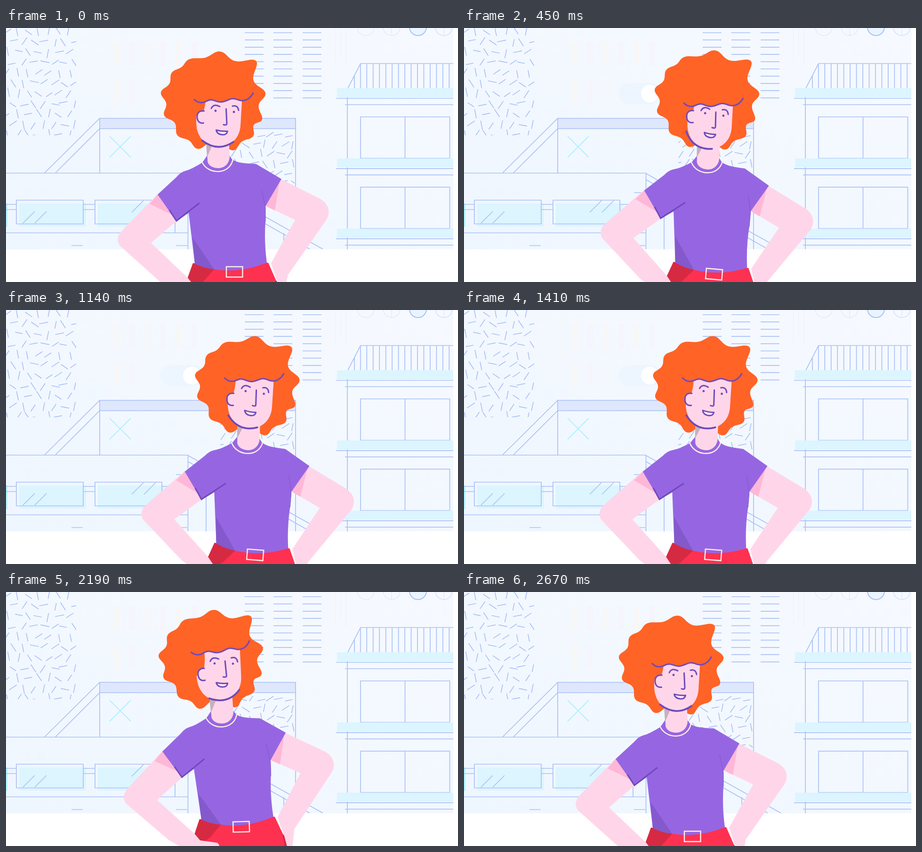
Write an HTML page that moves like this. It is 960x540 px and loops after 2700 ms.

```html
<!DOCTYPE html>
<html lang="en">
<head>
<meta charset="utf-8">
<title>Hands on hips</title>
<style>
  html, body { margin: 0; width: 100%; height: 100%; overflow: hidden; background: #fff; }
  svg { display: block; width: 960px; height: 540px; }
  .line { fill: none; stroke: #a9c1f6; stroke-width: 1.7; }
  .cyan { fill: #dcf5ff; }
  .hair { fill: #ff6326; }
  .skin { fill: #ffd6e9; }
  .blush { fill: #ffb7d7; }
  .ink { fill: none; stroke: #7049bd; stroke-width: 3; stroke-linecap: round; stroke-linejoin: round; }
  .trim { fill: none; stroke: #fff1e6; stroke-width: 2.4; }
</style>
</head>
<body>
<svg viewBox="0 0 960 540">
  <defs>
    <linearGradient id="sky" x1="0" y1="1" x2="1" y2="0">
      <stop offset="0" stop-color="#eef6ff"/><stop offset=".5" stop-color="#f3f8ff"/><stop offset="1" stop-color="#f6f9ff"/>
    </linearGradient>
    <clipPath id="town"><rect width="950" height="470.5"/></clipPath>
    <clipPath id="wall"><rect width="149" height="228"/></clipPath>
    <clipPath id="panel"><rect x="455" y="221" width="158" height="112"/></clipPath>
  </defs>

  <g clip-path="url(#town)">
    <rect width="950" height="471" fill="url(#sky)"/>
    <path id="wallDashes" class="line" clip-path="url(#wall)"/>

    <g id="bars"></g>
    <rect x="328" y="117" width="90" height="45" rx="22.5" fill="#edf5ff"/>
    <circle cx="395" cy="139.5" r="19" fill="#fff"/>
    <path id="slats" class="line"/>
    <path d="M700 0V72M711 0V60M722 0V75" stroke="#e9f0fc" fill="none"/>
    <g fill="none" stroke="#e1eafb" stroke-width="1.5">
      <circle cx="764" cy="-2" r="18"/>
      <circle cx="819" cy="-2" r="18"/><path d="M819 0V16"/>
      <circle cx="930" cy="-2" r="18" stroke="#d3e0fa"/><path d="M930 0V16M914 0H946"/>
    </g>
    <circle cx="875" cy="-2" r="18" fill="#eaf4ff" stroke="#a9c1f6" stroke-width="2"/>

    <rect x="199" y="192" width="416" height="22" fill="#dfe7fd"/>
    <path class="line" d="M199 308V192H615V471M199 214H615M199 192L82 308M199 214L105 308"/>
    <path d="M220 230L265 275M265 230L220 275" stroke="#b3f0fb" stroke-width="2"/>
    <path id="panelDashes" class="line" clip-path="url(#panel)"/>

    <rect y="373" width="3" height="50" fill="#b2f2ff"/>
    <path class="cyan" d="M28 373H170V422H28ZM195 373H337V422H195Z"/>
    <path class="line" d="M0 308.5H386.5V471M0 435.5H386M22 366H164V416.5H22ZM189 366H331V416.5H189Z
      M0 375H22M0 386H22M164 375H189M164 386H189M331 375H359M359 375V435
      M36 415L61 390M61 415L86 390M267 392L292 367M293 392L318 367
      M139 462.5H163M361 462.5H385M361 350H380M425 331V471M590 436V471
      M386 309L673 470M386 322L645 470"/>

    <path id="rails" class="line"/>
    <path class="line" d="M725 471V130L753 75.5H950"/>
    <g id="floors"></g>
  </g>

  <g class="head"><path id="mane" class="hair"/></g>

  <g id="body">
    <path fill="#ff3151" d="M397 500L386 532L380 575H590L575 540L557 499Z"/>
    <path fill="#d62a42" d="M397 500L442 513L418 540L400 552L385 533ZM572 536L581 542V565H577Z"/>
    <path class="skin" d="M322 353L246 431Q231 447 242 463L330 542L390 580L435 566Q441 556 433 551L397 545L386 531L308 457L364 409Z"/>
    <path class="skin" d="M583 321L667 363Q688 376 685 396Q684 403 679 410L598 526L592 570L582 565L576 540L563 500L614 408L551 378Z"/>
    <path class="blush" d="M324 352L305 374L354 398L346 386ZM582 322L551 378L571 388Z"/>
    <path fill="#9666e2" d="M417 286C402 295 392 301 380 304Q370 307 362 317L322 354L362 411L388 393L401 501Q474 531 554 499Q548 455 551 412V379L585 321L531 289C512 288 492 288 480 279L474 270H428Z"/>
    <path fill="#8459cc" d="M396 445L442 513Q418 510 401 501Z"/>
    <path d="M543 345L551 382V412" fill="none" stroke="#7f54cd"/>
    <path class="ink" style="stroke-linecap:butt;stroke-linejoin:miter" d="M347 387L362 410L411 372"/>
    <path class="skin" d="M425 235H473L475 272C475 289 463 298 451 298C437 298 427 290 428 280Z"/>
    <path fill="#c8b0bb" d="M425 245H440L427 275Z"/>
    <path class="trim" d="M417 286C430 313 476 312 482 279"/>
    <rect class="trim" x="468" y="507.5" width="34.5" height="22"/>
  </g>

  <g class="head">
    <g id="face">
      <path class="skin" d="M404 140V200C404 232 424 252.5 451 252.5S496 234 498 208L502 140Z"/>
      <path id="chin" class="ink" style="stroke-width:3.8" d="M416.5 239Q450 265 483 242"/>
    </g>
    <g id="ear">
      <path class="hair" d="M424 140C425 162 421 170 420 177C409 175 404 182 404 191H394V140Z"/>
      <path class="ink" d="M420.5 176.5C409 175 405 183 406 191C407 200 413 203 419.5 202"/>
    </g>
    <g id="features">
      <path class="ink" d="M436 171Q441 160 454 167M481 166Q492 163 494 175M467.5 172L469 203Q469 207.5 462 205.5"/>
      <path class="ink" style="fill:#ffeaf4" d="M446.5 217Q458 220 470.5 219.5Q469 227 460 227Q448 226 446.5 217Z"/>
      <g fill="#7049bd"><circle cx="445" cy="176" r="2.4"/><circle cx="484" cy="178.5" r="2.4"/></g>
    </g>
    <g id="fringe">
      <path class="hair" d="M400 152C408 160 418 160 425 156C440 147 446 160 460 157C475 154 476 146 494 153C505 157 518 152 525 138L505 110H420Z"/>
      <path class="ink" d="M400 152C408 160 418 160 425 156C440 147 446 160 460 157C475 154 476 146 494 153C505 157 518 152 525 138"/>
    </g>
  </g>
</svg>

<script>
const LOOP = 2700, STEP = 30;
const $ = id => document.getElementById(id);
const range = (n, fn) => Array.from({ length: n }, (_, i) => fn(i)).join('');

// Scenery
let seed = 11;
const rand = () => (seed = seed * 16807 % 2147483647) / 2147483647;

function dashes(x, y, w, h, cell) {
  let d = '';
  for (let j = 0; j <= h / cell; j++) {
    for (let i = -1; i <= w / cell; i++) {
      const a = Math.floor(rand() * 8) * Math.PI / 8 + .2, r = 8 + rand() * 2;
      const cx = x + (i + (j % 2) / 2 + rand() * .3) * cell, cy = y + (j + rand() * .3) * cell;
      const dx = r * Math.cos(a), dy = r * Math.sin(a);
      d += `M${cx - dx} ${cy - dy}L${cx + dx} ${cy + dy}`;
    }
  }
  return d;
}
$('wallDashes').setAttribute('d', dashes(0, 4, 149, 228, 22));
$('panelDashes').setAttribute('d', dashes(458, 225, 156, 108, 20));
$('slats').setAttribute('d', range(10, i =>
  [507, 568, 630].map(x => `M${x} ${10 + i * 15.4}h40`).join('')));
$('rails').setAttribute('d', 'M740 102V128' + range(15, i => `M${752.8 + i * 13.46} 75.5V128`));
$('bars').innerHTML = range(8, i =>
  `<rect x="${229 + i % 6 * 33}" y="${i < 6 ? 30 : 112}" width="11" height="50" fill="${i % 2 ? '#f6f4fc' : '#f8f7f8'}"/>`);
$('floors').innerHTML = range(3, i => {
  const y = 128 + i * 149.3;
  const pane = i < 2 ? `M753 ${y + 61}h189.5v88h-189.5ZM847.5 ${y + 61}v88` : '';
  return `<rect class="cyan" x="703" y="${y}" width="247" height="19"/>
    <path class="line" d="M701 ${y + 21.5}H950M720 ${y + 35}H950${pane}"/>`;
});

// Curls: tip x, tip y, depth of the hollow before the next tip
const curls = [
  [455, 50, 12], [531, 70, 17], [551, 138, 11], [544, 194, 10], [525, 230, 4], [481, 260, 20],
  [409, 257, 4], [364, 228, 10], [336, 186, 8], [329, 137, 7], [352, 95, 3], [390, 66, 5]
];
function curlPoints() {
  return curls.flatMap(([x, y, depth], i) => {
    const [nx, ny] = curls[(i + 1) % curls.length];
    const mx = (x + nx) / 2, my = (y + ny) / 2;
    const dx = 440 - mx, dy = 150 - my, k = depth / Math.hypot(dx, dy);
    return [[x, y], [mx + dx * k, my + dy * k]];
  });
}

// Closed smooth curve through points
function smooth(p) {
  const at = i => p[(i + p.length) % p.length];
  const ctrl = (a, b, c) => [0, 1].map(k => a[k] + (c[k] - b[k]) / 5);
  return `M${p[0]}` + range(p.length, i => {
    const a = at(i - 1), b = at(i), c = at(i + 1), d = at(i + 2);
    return `C${ctrl(b, a, c)} ${ctrl(c, d, b)} ${c}`;
  }) + 'Z';
}
$('mane').setAttribute('d', smooth(curlPoints()));

// Motion
const ramp = (t, a, b) => Math.min(1, Math.max(0, (t - a) / (b - a)));
const ease = (t, a, b) => { const u = ramp(t, a, b); return u * u * (3 - 2 * u); };
const bump = (t, a, b) => Math.sin(Math.PI * ramp(t, a, b)) ** 2;

const heads = document.querySelectorAll('.head');
const place = (el, x, y, r, cx, cy) =>
  el.setAttribute('transform', `translate(${x} ${y}) rotate(${r} ${cx} ${cy})`);

function draw() {
  const t = Math.floor(performance.now() % LOOP / STEP) * STEP;

  const side = ease(t, 0, 340) - ease(t, 1875, 2385);
  const hopRight = bump(t, 0, 420), hopLeft = bump(t, 1890, 2490);
  const hop = hopRight + hopLeft, kick = hopRight - hopLeft;
  const dip = bump(t, 360, 570) + bump(t, 1620, 1980) + bump(t, 2400, 2740);
  const duck = ease(t, 300, 490) - ease(t, 570, 870) + ease(t, 1440, 1680) - ease(t, 1890, 2100);
  const nod = 1.7 * duck - .7 * side - .85 * hop;
  const tilt = 2.3 * side + 5.5 * kick - .5 * duck;
  const chin = 20 * side + 25 * kick + 13 * duck;
  const faceTilt = .6 * kick - 2 * side;

  place($('body'), (44 + 2 * dip) * side, 2 * side - 20 * hop + 3 * dip, (4.6 + .4 * dip) * side + 3 * kick, 485, 518);
  heads.forEach(el => place(el, 72.5 * side + 29 * kick + 4 * duck, 5 * side - 12.7 * hop - 10 * duck + dip, tilt, 440, 137.5));
  place($('face'), -3.3 * side - 3 * kick, 8.8 * nod, faceTilt, 452, 200);
  place($('chin'), 0, 0, chin - tilt - faceTilt, 451, 200);
  place($('ear'), -7.3 * side - 5.7 * kick, 4 * nod, faceTilt, 412, 189);
  place($('features'), -8 * side - 3.3 * kick, 11 * nod, 2.4 * side - kick, 464, 190);
  place($('fringe'), -8 * side - 1.5 * kick, 15 * nod, 0, 462, 145);
  requestAnimationFrame(draw);
}
draw();
</script>
</body>
</html>
```
